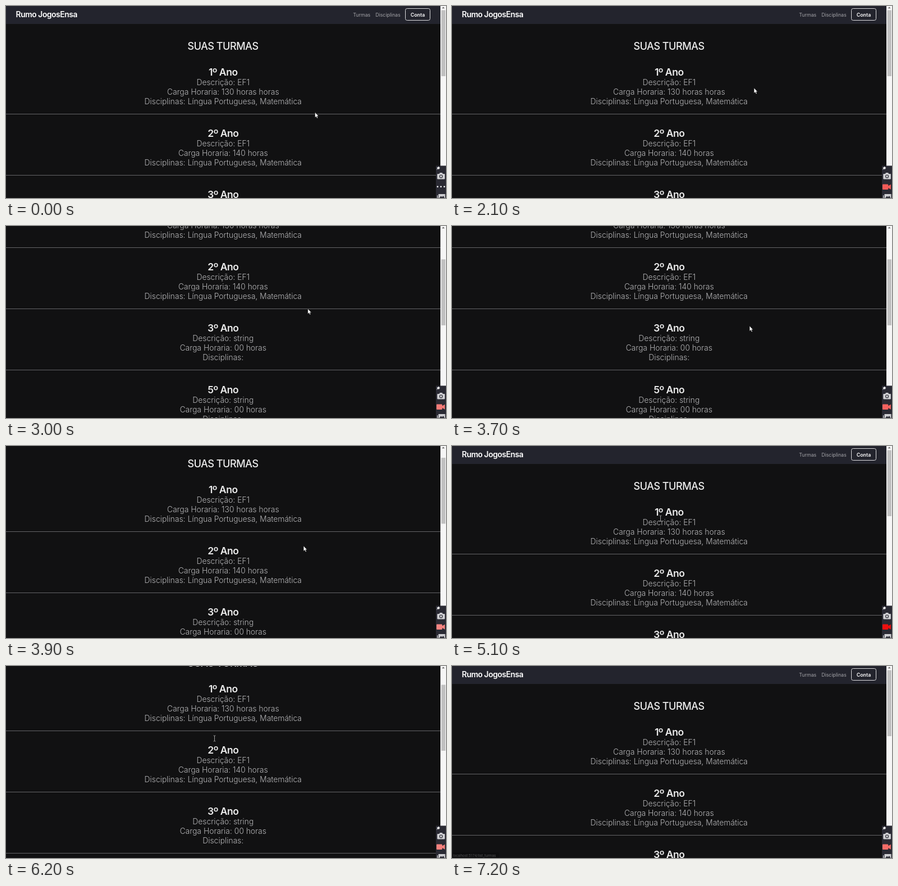
An HTML page that plays this animation: 786x342 px, repeating every 7300 ms.

```html
<!DOCTYPE html>
<html lang="pt-BR">
<head>
<meta charset="utf-8">
<title>Suas turmas</title>
<style>
  html, body { margin: 0; width: 100%; height: 100%; overflow: hidden; background: #111112; }
  svg { display: block; width: 786px; height: 342px; font-family: Inter, Roboto, sans-serif; }
  .mid { text-anchor: middle; }
  .title { font-size: 18.2px; letter-spacing: -.55px; font-weight: 500; fill: #ececec; }
  .year { font-size: 17.6px; letter-spacing: -.5px; font-weight: 600; fill: #ececec; }
  .info { font-size: 13.9px; font-weight: 300; fill: #b6b6b8; }
  .brand { font-size: 14px; letter-spacing: -.5px; font-weight: 600; fill: #fff; }
  .link { font-size: 8.8px; fill: #a5a5a9; }
  .button { font-size: 8.8px; font-weight: 600; fill: #fff; }
  .url { font: 6.4px Roboto, sans-serif; fill: #a8a8a8; }
  .rule { fill: #646467; shape-rendering: crispEdges; }
</style>
</head>
<body>
<svg viewBox="0 0 786 342">
  <rect width="786" height="342" fill="#111112"/>
  <g id="page">
    <rect width="776" height="32" fill="#23242d"/>
    <text class="brand" x="17.5" y="20">Rumo JogosEnsa</text>
    <text class="link" x="620" y="18.6">Turmas</text>
    <text class="link" x="660" y="18.6">Disciplinas</text>
    <rect x="713.5" y="4.5" width="44" height="21" rx="3" fill="none" stroke="#dcdcde"/>
    <text class="button mid" x="735.5" y="18.6">Conta</text>
    <text class="title mid" x="387.5" y="78.3">SUAS TURMAS</text>
    <g id="list"></g>
  </g>

  <g id="status">
    <path d="M0 332H82Q84 332 84 334V342H0Z" fill="#0a0a0b"/>
    <text class="url" x="2" y="339.6">localhost:5174/list_turmas</text>
  </g>

  <rect x="776" width="10" height="342" fill="#f6f6f6"/>
  <path d="M778.8 4.2L781.2 1.6L783.6 4.2Z" fill="#666"/>
  <rect id="thumb" x="777.5" y="7.5" width="7.5" height="117.5" fill="#c1c1c1"/>

  <rect x="768" y="284.5" width="18" height="58" fill="#2a2a33"/>
  <path d="M772.3 285.7L775.5 288.6L774.2 289.2L773.3 291.2L771.7 290L769 292.2L770.6 289.2L769.4 287.9L771.5 287.3Z" fill="#f0f0f0"/>
  <g fill="#cfcfd2">
    <path d="M771.5 299H774L775 297H779.2L780.2 299H782.8Q784 299 784 300.2V307.3Q784 308.5 782.8 308.5H771.5Q770.3 308.5 770.3 307.3V300.2Q770.3 299 771.5 299Z"/>
    <path d="M772.5 335H784.5V342H772.5ZM770 337.2H771.3V342H770Z"/>
  </g>
  <circle cx="777.1" cy="303.5" r="2.5" fill="none" stroke="#2a2a33" stroke-width="1.2"/>
  <path d="M774 342L777 338.5L779 340.5L781 338L783.5 342Z" fill="#2a2a33"/>
  <path id="camera" d="M770 317.5H778Q779.3 317.5 779.3 318.8V320.6L784 317.8V326.8L779.3 324V325.8Q779.3 327.1 778 327.1H770Q769 327.1 769 326V318.6Q769 317.5 770 317.5Z"/>
  <path id="dots" d="M771 321.8h0M777 321.8h0M783 321.8h0" stroke="#fff" stroke-width="2.8" stroke-linecap="round"/>

  <path id="arrow" d="M0 0V9.2L2.1 7.3L3.6 10.6L5.1 9.9L3.7 6.8H6.4Z" fill="#fff" stroke="#111" stroke-width=".5"/>
  <path id="beam" d="M-1.8 -5H-.5L0 -4.5L.5 -5H1.8M0 -4.5V4.5M-1.8 5H-.5L0 4.5L.5 5H1.8" fill="none" stroke="#c4c4c4" stroke-width=".8"/>
</svg>
<script>
  const LOOP = 7300, TICK = 100, PITCH = 109.2, SCROLL = 154, BLINK = 790;
  const $ = id => document.getElementById(id);

  const both = 'Língua Portuguesa, Matemática';
  const classes = [
    ['1º Ano', 'EF1', '130 horas horas', both],
    ['2º Ano', 'EF1', '140 horas', both],
    ['3º Ano', 'string', '00 horas', ''],
    ['5º Ano', 'string', '00 horas', '']
  ];
  const line = (cls, y, text) => `<text class="${cls} mid" x="387.8" y="${y}">${text}</text>`;
  $('list').innerHTML = classes.map(([year, about, load, subjects], i) => {
    const info = [`Descrição: ${about}`, `Carga Horaria: ${load}`, `Disciplinas: ${subjects}`];
    return `<g transform="translate(0 ${Math.round(i * PITCH)})">` +
      line('year', 124.2, year) +
      info.map((text, row) => line('info', 141.4 + row * 16.8, text)).join('') +
      '<rect class="rule" y="192" width="776" height="1"/></g>';
  }).join('');

  const ramp = (t, from, to) => Math.min(1, Math.max(0, (t - from) / (to - from)));
  const ease = k => k * k * (3 - 2 * k);
  const glide = (t, from, to) => ease(ramp(t, from, to));

  // Each pointer move: start, end, destination.
  const home = { x: 552, y: 189.5 };
  const moves = [
    { from: 0, to: 300, x: 300, y: 78 },
    { from: 500, to: 900, x: 632, y: 13 },
    { from: 1000, to: 1400, x: 402, y: 96 },
    { from: 1400, to: 1600, x: 539.5, y: 146 },
    { from: 2900, to: 3700, x: 531.5, y: 178 },
    { from: 4500, to: 5100, x: 372.5, y: 129 },
    { from: 6400, to: 6800, x: 632, y: 13 },
    { from: 6800, to: 6900, x: 632, y: -20 }
  ];
  const pointer = t => moves.reduce((p, m) => {
    const k = glide(t, m.from, m.to);
    return { x: p.x + (m.x - p.x) * k, y: p.y + (m.y - p.y) * k };
  }, home);

  // The list is scrolled down and back up twice.
  const scrollAt = t => SCROLL * (glide(t, 2200, 2600) - glide(t, 3700, 4000) +
    glide(t, 5300, 5600) - glide(t, 6000, 6400));

  // The address hint lingers after the pointer reaches the link.
  const hint = age => ramp(age, -100, 0) - ramp(age, 250, 500);

  const show = (id, on) => $(id).setAttribute('visibility', on ? 'visible' : 'hidden');
  const move = (id, x, y) => $(id).setAttribute('transform', `translate(${x} ${y})`);

  function draw(t) {
    const scroll = scrollAt(t);
    move('page', 0, -scroll);
    move('thumb', 0, scroll * .337);

    const { x, y } = pointer(t);
    const overText = t > 4500 && x < 529 && y > 124;
    move('arrow', x, y);
    move('beam', x, y);
    show('arrow', !overText);
    show('beam', overText);

    const pale = Math.abs(Math.sin(Math.PI * (t - 2700) / BLINK));
    $('camera').setAttribute('fill', `rgb(${236 + 9 * pale},${132 * pale},${128 * pale})`);
    show('camera', t >= TICK);
    show('dots', t < TICK);
    $('status').setAttribute('opacity', hint(t - 900) + hint(t - 6800));
  }

  const start = performance.now();
  function frame() {
    const t = (performance.now() - start) % LOOP;
    draw(Math.floor(t / TICK) * TICK);
    requestAnimationFrame(frame);
  }
  frame();
</script>
</body>
</html>
```
